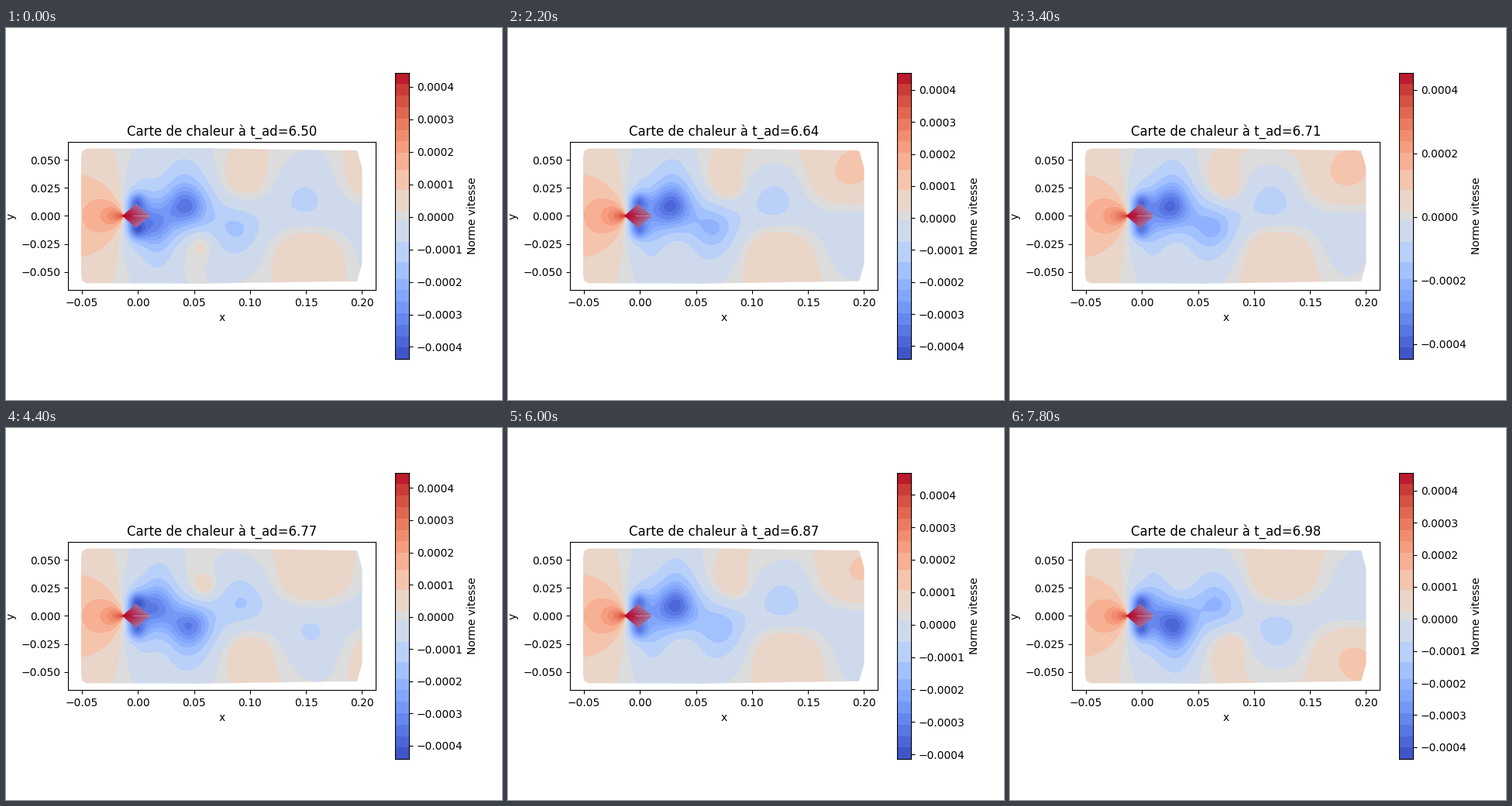
Recreate the animation shown at these times as a matplotlib script. Size 640 px wide and 480 px high, loop 8000 ms.

```python
import numpy as np
import matplotlib.pyplot as plt
from matplotlib.animation import FuncAnimation
from matplotlib.colors import LinearSegmentedColormap
from matplotlib.patches import Polygon

FRAMES, INTERVAL = 40, 200
SCALE = 1445.0            # pixels per data unit
X0, Y0 = 170.3, 242.4     # pixel position of the data origin
SHED = 0.161              # shedding periods per frame

# colour bands, in steps counted from the middle of the scale
HALF = np.r_[.8, 4.5, 8, np.arange(11, 26, 2)]
EDGES = np.r_[-HALF[::-1], HALF]
COLORS = plt.get_cmap("coolwarm")((EDGES[:-1] + EDGES[1:]) / 100 + 0.5)

# mesh outline and body: pixel x, height above the axis of symmetry
UPPER = np.array([(97, 77), (98.5, 84), (104, 86.8), (250, 87.4),
                  (375, 85.4), (453, 84.4), (459.5, 62)])
HULL = np.vstack([UPPER, (UPPER * [1, -1])[::-1]])
BODY = np.array([(150, 0), (168, 15.5), (186, 0), (168, -15.5)])


def to_data(points):
    return (np.asarray(points, float) - [X0, 0]) / SCALE


px, up = np.meshgrid(np.linspace(95, 462, 368), np.linspace(-89, 89, 179))


def bump(x, y, r):
    return np.exp(-((px - x) ** 2 + (up - y) ** 2) / r ** 2)


def bell(t, center, width):
    return np.exp(-((t - center) / width) ** 2)


def path(age):
    """Pixel x of a vortex; age is counted in shedding periods."""
    return 234 + 112 * age + 40 * age ** 2


def age_at(x):
    return (np.sqrt(np.maximum(112 ** 2 + 160 * (x - 234), 0)) - 112) / 80


def steady_field():
    dx = px - 152
    r = np.hypot(dx, up) + 1e-6
    behind = dx > 0
    dipole = -640 * dx / r / (r + np.where(behind, 45, 26))
    gain = np.where(behind, 1.25 * bell(dx, 0, 115), 1)
    corners = bump(168, 19, 12) + bump(168, -19, 12)
    corridor = 3.2 * np.clip(dx / 70, 0, 1) * bell(up, 0, 33)
    return dipole * gain - 11 * corners - corridor


steady = steady_field()
ages = age_at(px)
rise_in = np.clip((px - 170) / 150, 0, 1)
spread = 50 + .35 * np.maximum(px - 350, 0)
fade = bell(np.maximum(np.abs(up) - 25, 0), 0, spread)
lanes = 4.5 * np.clip((px - 170) / 50, 0, 1) * np.tanh(up / 40) * fade


def vortex(age, side):
    x, y = path(age), side * (13 + 6 * max(age, 0))
    depth = 13 * bell(age, -.15, .45) + 4 * bell(age, .75, .35)
    core = .75 * bump(x, y, 24 - 4 * np.clip(age, 0, 1)) + .3 * bump(x, y, 50)
    ridge = 5 * bell(age, .12, .22) * bump(x + 18, -side * 36, 17)
    return ridge - depth * core


def field(i):
    phase = i * SHED
    drift = 1.5 + .6 * np.cos(4 * np.pi * (phase - .2))
    b = steady + drift * rise_in - lanes * np.cos(2 * np.pi * (ages - phase))
    for k in range(-2, 4):
        side = 1 if k % 2 == 0 else -1
        b = b + vortex(phase % 1 + k / 2, side)
    return np.clip(b, -24.99, 24.99)


def scale_limits(i):
    phase = i * SHED % .5
    middle = .03 + .26 * bell(phase, .32, .035)
    span = 8.9 + .17 * np.cos(4 * np.pi * (phase - .17))
    return (middle - span / 2) * 1e-4, (middle + span / 2) * 1e-4


fig = plt.figure(figsize=(6.4, 4.8), dpi=100)
ax = fig.add_axes([.125, .11, .62, .77])
ax.set_xlabel("x")
ax.set_ylabel("y")
title = ax.set_title("")

cax = fig.add_axes([.78375, .11, 18.48 / 640, .77])
cax.pcolormesh([0, 1], EDGES / 50 + .5, np.arange(len(COLORS))[:, None],
               cmap=LinearSegmentedColormap.from_list("bands", COLORS, len(COLORS)),
               transform=cax.transAxes)
cax.set_xlim(0, 1)
cax.set_xticks([])
cax.yaxis.tick_right()
cax.yaxis.set_label_position("right")
cax.set_ylabel("Norme vitesse")

hull = ax.add_patch(Polygon(to_data(HULL), fc="none", ec="none"))
body = ax.add_patch(Polygon(to_data(BODY), fc="none", ec="none"))
body_map = LinearSegmentedColormap.from_list(
    "body", ["#b40426", "#b5234a", "#a85a85", "#9a86b8"])
u, v = np.meshgrid(np.linspace(0, 1, 64), np.linspace(-1, 1, 65))
(left, low), (right, high) = to_data([(150, -15.5), (186, 15.5)])
shade = ax.imshow(.8 * u + .4 * np.abs(v), cmap=body_map, vmin=0, vmax=1,
                  extent=(left, right, low, high), zorder=3)
shade.set_clip_path(body)
ax.plot(*to_data([(164, 0), (185, 0)]).T, color="#c9a9b8", lw=.5, zorder=4)
ax.set_aspect("equal")
ax.set_autoscale_on(False)
ax.set_xlim(to_data([(80, 0), (476.8, 0)])[:, 0])
ax.set_ylim(-.0661, .0661)

gx, gy = (px - X0) / SCALE, up / SCALE
state = {}


def draw(i):
    if "map" in state:
        state["map"].remove()
    cs = ax.contourf(gx, gy, field(i), levels=EDGES, colors=COLORS, zorder=1)
    cs.set_clip_path(hull)
    state["map"] = cs
    cax.set_ylim(scale_limits(i))
    title.set_text(f"Carte de chaleur à t_ad={6.504 + .0123 * i:.2f}")
    return cs, title


anim = FuncAnimation(fig, draw, frames=FRAMES, init_func=lambda: draw(0),
                     interval=INTERVAL, repeat=True, repeat_delay=0, blit=False)
plt.show()
```
